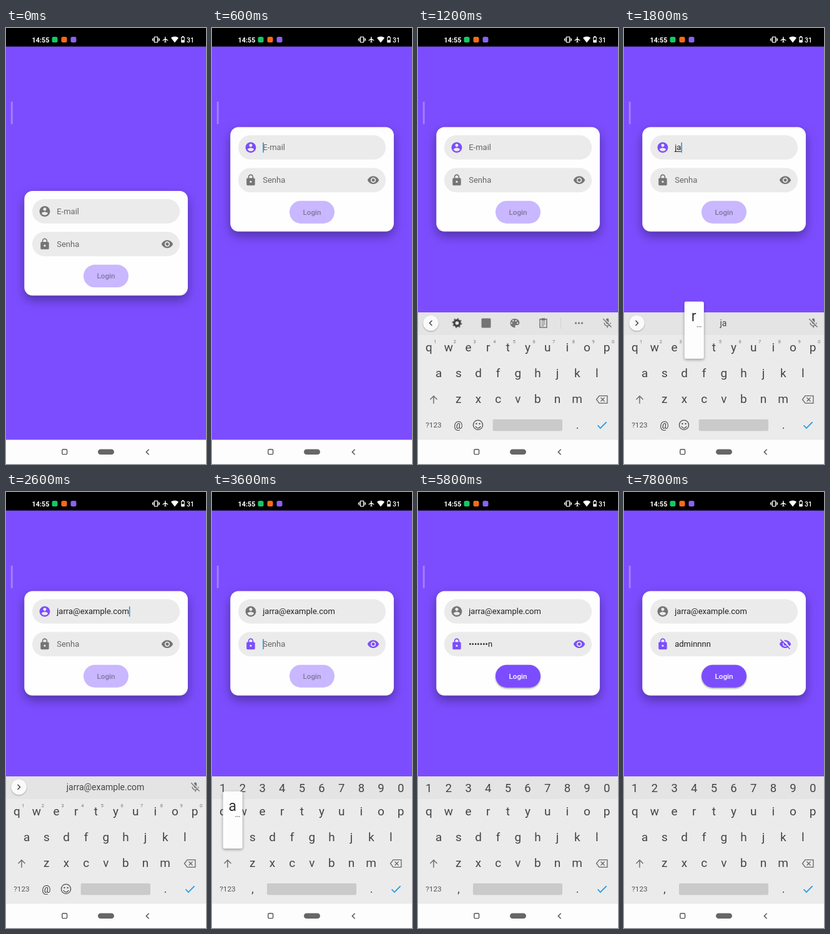
These frames come from a looping animation (320 by 693 pixels, 8000 ms). An HTML page with a canvas:

```html
<!DOCTYPE html>
<html lang="pt-BR">
<head>
<meta charset="utf-8">
<title>Login</title>
<style>
html, body { margin: 0; width: 100%; height: 100%; overflow: hidden; background: #7c4dff; }
canvas { display: block; width: 320px; height: 693px; }
</style>
</head>
<body>
<canvas id="stage"></canvas>
<script>
const W = 320, H = 693, LOOP = 8000, TICK = 200;
const KB_TOP = 452, KB_H = H - KB_TOP, PITCH = 31.65;
const PURPLE = '#7c4dff', GREY = '#757575', INK = '#454545', BLUE = '#2196e3';
const EMAIL = 'jarra@example.com', SECRET = 'adminnnn';

const canvas = document.getElementById('stage');
const ctx = canvas.getContext('2d');
const dpr = window.devicePixelRatio || 1;
canvas.width = W * dpr;
canvas.height = H * dpr;

const USER = new Path2D('M12 2C6.48 2 2 6.48 2 12s4.48 10 10 10 10-4.48 10-10S17.52 2 12 2zm0 3c1.66 0 3 1.34 3 3s-1.34 3-3 3-3-1.34-3-3 1.34-3 3-3zm0 14.2c-2.5 0-4.71-1.28-6-3.22.03-1.99 4-3.08 6-3.08 1.99 0 5.97 1.09 6 3.08-1.29 1.94-3.5 3.22-6 3.22z');
const LOCK = new Path2D('M18 8h-1V6c0-2.76-2.24-5-5-5S7 3.24 7 6v2H6c-1.1 0-2 .9-2 2v10c0 1.1.9 2 2 2h12c1.1 0 2-.9 2-2V10c0-1.1-.9-2-2-2zm-6 9c-1.1 0-2-.9-2-2s.9-2 2-2 2 .9 2 2-.9 2-2 2zm3.1-9H8.9V6c0-1.71 1.39-3.1 3.1-3.1s3.1 1.39 3.1 3.1v2z');
const EYE = new Path2D('M12 4.5C7 4.5 2.73 7.61 1 12c1.73 4.39 6 7.5 11 7.5s9.27-3.11 11-7.5c-1.73-4.39-6-7.5-11-7.5zM12 17c-2.76 0-5-2.24-5-5s2.24-5 5-5 5 2.24 5 5-2.24 5-5 5zm0-8c-1.66 0-3 1.34-3 3s1.34 3 3 3 3-1.34 3-3-1.34-3-3-3z');
const PLANE = new Path2D('M10.2 9V3.5a1.5 1.5 0 0 1 3 0V9l8.3 5v2l-8.3-2.5V19l2.3 1.5V22l-3.8-1-3.7 1v-1.5l2.2-1.5v-5.5L2 16v-2z');
const WIFI = new Path2D('M12 22L0 7C7 1 17 1 24 7z');
const PALETTE = new Path2D('M12 3a9 9 0 0 0 0 18c1.5 0 2-1.3 1.3-2.4-.8-1.2 0-2.6 1.7-2.6h2a5 5 0 0 0 5-5c0-4.4-4.5-8-10-8z');

// Each step overrides the state from its time on.
const STEPS = [
  [0, { focus: '', email: '', pass: '', pop: '', caret: false, show: false, typing: false }],
  [400, { focus: 'email', caret: true }],
  [1200, { caret: false }],
  [1400, { caret: true, pop: 'j' }],
  [1600, { email: 'j', pop: 'a', typing: true }],
  [1800, { email: 'ja', pop: 'r' }],
  [2000, { email: 'jar', pop: '', hint: EMAIL }],
  [2400, { caret: false }],
  [2600, { email: EMAIL, caret: true, hint: '' }],
  [2800, { typing: false }],
  [3200, { focus: 'pass' }],
  [3600, { pop: 'a' }],
  [3800, { pass: 'a', pop: 'd' }],
  [4000, { pass: '•d', pop: 'm' }],
  [4200, { pass: '••m', pop: '' }],
  [4400, { pop: 'i' }],
  [4600, { pass: '•••i', pop: 'n' }],
  [4800, { pass: '••••n' }],
  [5000, { pass: '•••••n' }],
  [5200, { pass: '••••••n' }],
  [5400, { pass: '•••••••n', pop: '' }],
  [5800, { caret: false }],
  [6200, { pass: SECRET, show: true }],
  [6400, { caret: true }],
  [6800, { pass: '••••••••', show: false }],
  [7000, { caret: false }],
  [7200, { pass: SECRET, show: true }],
  [7400, { caret: true }],
  [7800, { caret: false }]
];

const stateAt = t => Object.assign({}, ...STEPS.filter(s => s[0] <= t).map(s => s[1]));

function box(x, y, w, h, r, fill) {
  ctx.beginPath();
  ctx.roundRect(x, y, w, h, r);
  ctx.fillStyle = fill;
  ctx.fill();
}

function disc(x, y, r, fill) {
  box(x - r, y - r, 2 * r, 2 * r, r, fill);
}

function line(points, color, width = 1.5, close = false) {
  ctx.beginPath();
  points.forEach(([x, y]) => ctx.lineTo(x, y));
  if (close) ctx.closePath();
  ctx.strokeStyle = color;
  ctx.lineWidth = width;
  ctx.stroke();
}

function text(s, x, y, size, color, align = 'center', weight = 400) {
  ctx.font = `${weight} ${size}px Roboto, sans-serif`;
  ctx.textAlign = align;
  ctx.fillStyle = color;
  ctx.fillText(s, x, y);
}

function shadowed(blur, dy, alpha, draw) {
  ctx.save();
  ctx.shadowColor = `rgba(0,0,0,${alpha})`;
  ctx.shadowBlur = blur * dpr;
  ctx.shadowOffsetY = dy * dpr;
  draw();
  ctx.restore();
}

function icon(path, cx, cy, size, color) {
  ctx.save();
  ctx.translate(cx - size / 2, cy - size / 2);
  ctx.scale(size / 24, size / 24);
  ctx.fillStyle = color;
  ctx.fill(path, 'evenodd');
  ctx.restore();
}

function statusBar() {
  box(0, 0, W, 29.5, 0, '#000');
  text('14:55', 41.5, 22.5, 10.8, '#fff', 'left', 700);
  ['#16c765', '#f66b16', '#8a62f5'].forEach((c, i) => box(73.5 + 15 * i, 14, 9, 9, 2.5, c));
  ctx.strokeStyle = '#fff';
  ctx.lineWidth = 1.1;
  ctx.strokeRect(237.6, 14.2, 4.8, 8.6);
  for (const d of [-1, 1]) {
    line([[240 + d * 4, 15.5], [240 + d * 4, 21.5]], '#fff', 1.1);
    line([[240 + d * 5.6, 16.8], [240 + d * 5.6, 20.2]], '#fff', 1.1);
  }
  icon(PLANE, 255, 18.3, 11, '#fff');
  icon(WIFI, 270, 18.2, 12, '#fff');
  box(280.2, 14, 5.6, 9.3, 1, '#fff');
  box(281.7, 13, 2.6, 1.5, 0, '#fff');
  box(281.3, 15.2, 3.4, 4, 0, '#000');
  text('31', 289, 22.5, 10.5, '#fff', 'left', 500);
}

function field(y, glyph, label, value, active, s) {
  const mid = y + 19.4;
  box(42, y, 236, 38.8, 19.4, '#ebebeb');
  icon(glyph, 62, mid, 20.2, active ? PURPLE : GREY);
  text(value || label, 81.2, mid + 4.6, 13, value ? '#212121' : '#666', 'left');
  const end = 81.2 + (value ? ctx.measureText(value).width : 0);
  if (value && active && s.typing && value !== EMAIL) box(81.5, mid + 6.1, end - 81.5, 1, 0, '#212121');
  if (active && s.caret) box(end, mid - 8, 1.6, 16.5, 0.8, BLUE);
}

function eye(x, y, color, off) {
  icon(EYE, x, y, 20, color);
  if (!off) return;
  line([[x - 6.3, y - 8.8], [x + 8.8, y + 6.3]], '#ebebeb', 1.8);
  line([[x - 7.6, y - 7.3], [x + 7.4, y + 7.7]], color, 1.6);
}

function loginCard(y, s, enabled) {
  shadowed(17, 7, 0.36, () => box(29.3, y, 261.6, 166.2, 13, '#fefefe'));
  field(y + 13, USER, 'E-mail', s.email, s.focus === 'email', s);
  field(y + 65, LOCK, 'Senha', s.pass, s.focus === 'pass', s);
  eye(258, y + 84.4, s.focus === 'pass' ? PURPLE : GREY, s.show);
  const button = () => box(124, y + 117.3, 72, 36, 18, enabled ? PURPLE : '#c9b7ff');
  enabled ? shadowed(3, 1.5, 0.4, button) : button();
  text('Login', 160, y + 139.4, 11.7, enabled ? '#fff' : '#81749f', 'center', 500);
}

const ROWS = [['qwertyuiop', 17.3, 508], ['asdfghjkl', 33.2, 549], ['zxcvbnm', 64.8, 590]];

function mic(x, y) {
  box(x - 2.2, y - 7.5, 4.4, 9, 2.2, GREY);
  ctx.beginPath();
  ctx.arc(x, y - 0.5, 5, 0, Math.PI);
  ctx.strokeStyle = GREY;
  ctx.lineWidth = 1.4;
  ctx.stroke();
  line([[x, y + 4.5], [x, y + 7.5]], GREY);
  line([[x - 5.8, y - 7.8], [x + 7.2, y + 5.2]], '#e4e4e4', 1.5);
  line([[x - 6.8, y - 6.8], [x + 6.5, y + 6.5]], GREY, 1.4);
}

function tools(y) {
  ctx.save();
  ctx.setLineDash([2.7, 2.7]);
  ctx.beginPath();
  ctx.arc(62.5, y, 6.9, 0, 7);
  ctx.strokeStyle = GREY;
  ctx.lineWidth = 2.2;
  ctx.stroke();
  ctx.restore();
  ctx.beginPath();
  ctx.arc(62.5, y, 4.5, 0, 7);
  ctx.lineWidth = 3.4;
  ctx.stroke();
  box(101.5, y - 7.5, 15, 15, 1.5, GREY);
  icon(PALETTE, 154.5, y, 19, GREY);
  [[-4.8, 0], [-2.3, -3.8], [2.3, -3.8], [4.8, 0]].forEach(([dx, dy]) => disc(154.5 + dx, y + dy, 1.2, '#e4e4e4'));
  ctx.strokeStyle = GREY;
  ctx.lineWidth = 1.5;
  ctx.strokeRect(195, y - 6.2, 11, 13.2);
  box(197.4, y - 7.7, 6.2, 4, 1, GREY);
  [-1.5, 1.5, 4.3].forEach((dy, i) => line([[197.5, y + dy], [i < 2 ? 203.5 : 201.5, y + dy]], GREY, 1.2));
  line([[228.5, y - 9], [228.5, y + 9]], '#d2d2d2', 1);
  [-5, 0, 5].forEach(dx => disc(257.5 + dx, y, 1.6, GREY));
}

function topBar(s) {
  const y = 469;
  if (s.focus === 'pass') {
    [...'1234567890'].forEach((d, i) => text(d, 17.3 + PITCH * i, y + 7.8, 18.5, INK));
    return;
  }
  shadowed(2, 1, 0.3, () => disc(20.5, y, 12.3, '#fafafa'));
  const d = s.typing ? 2 : -2;
  line([[20.5 - d, y - 4], [20.5 + d, y], [20.5 - d, y + 4]], '#444', 1.5);
  if (s.typing) text(s.hint || s.email, 159, y + 5.2, 14, INK);
  else tools(y);
  mic(303, y);
}

function bottomRow(pass) {
  text('?123', 25, 635.3, 11.8, '#555');
  if (pass) {
    text(',', 65, 637, 18, INK);
  } else {
    text('@', 64.5, 637, 16, INK);
    ctx.strokeStyle = '#555';
    ctx.lineWidth = 1.4;
    ctx.beginPath();
    ctx.arc(96, 631, 7.6, 0, 7);
    ctx.stroke();
    ctx.beginPath();
    ctx.arc(96, 632, 4, 0.2, Math.PI - 0.2);
    ctx.stroke();
    disc(93.4, 629, 1.2, '#555');
    disc(98.6, 629, 1.2, '#555');
  }
  const x = pass ? 88 : 119.7;
  box(x, 622, 231 - x, 18.5, 2, '#cacaca');
  text('.', 255, 637, 18, INK);
  line([[287.5, 631.5], [291.8, 636], [301.5, 626.3]], BLUE, 1.7);
}

function popup(key) {
  const row = ROWS.find(r => r[0].includes(key));
  const x = row[1] + PITCH * row[0].indexOf(key), y = row[2] - 73.3;
  shadowed(4, 1.5, 0.4, () => box(x - 15.6, y, 31.2, 91, 3, '#fdfdfd'));
  text(key, x - 0.5, y + 31, 23, '#333');
  if ('arid'.includes(key)) [6, 8.7, 11.4].forEach(dx => disc(x + dx - 0.8, y + 40, 0.75, '#444'));
}

function keyboard(s) {
  const pass = s.focus === 'pass';
  box(0, KB_TOP, W, KB_H, 0, '#ebebeb');
  box(0, KB_TOP, W, 36, 0, '#e4e4e4');
  box(0, 654.5, W, 40, 0, '#fdfdfd');
  topBar(s);
  ROWS.forEach(([keys, x, y], r) => [...keys].forEach((k, i) => {
    text(k, x + PITCH * i, y + 6, 19, INK);
    if (!r && !pass) text((i + 1) % 10, x + PITCH * i + 10, y - 7, 7.5, '#777');
  }));
  line([[25, 597], [25, 585.5]], '#666', 1.4);
  line([[19.5, 590.5], [25, 585], [30.5, 590.5]], '#666', 1.4);
  line([[285.5, 590.5], [290, 584.7], [302.8, 584.7], [302.8, 596.3], [290, 596.3]], '#666', 1.3, true);
  line([[292.5, 587.5], [298.5, 593.5]], '#666', 1.3);
  line([[298.5, 587.5], [292.5, 593.5]], '#666', 1.3);
  bottomRow(pass);
  if (s.pop) popup(s.pop);
}

function navIcons() {
  ctx.beginPath();
  ctx.roundRect(89.8, 669.8, 7.8, 7.8, 1.6);
  ctx.strokeStyle = '#555';
  ctx.lineWidth = 1.4;
  ctx.stroke();
  box(147, 669.5, 26, 8.6, 4.3, '#666');
  line([[228.6, 669.8], [224.4, 674], [228.6, 678.2]], '#555', 1.5);
}

function draw(t) {
  const s = stateAt(t);
  const p = Math.min(1, Math.max(0, (t - 640) / 400));
  ctx.setTransform(dpr, 0, 0, dpr, 0, 0);
  box(0, 0, W, H, 0, PURPLE);
  box(7.8, 117, 2.9, 36, 1, '#a380fb');
  loginCard(t < 600 ? 259 : 157.4, s, t >= 5200);
  statusBar();
  box(0, 654.5, W, 40, 0, '#fdfdfd');
  if (p > 0) {
    box(0, 654.5, W, 40, 0, PURPLE);
    ctx.save();
    ctx.translate(0, KB_H * (1 - p) ** 2);
    keyboard(s);
    ctx.restore();
  }
  navIcons();
}

const start = performance.now();
function frame() {
  const t = (performance.now() - start) % LOOP;
  draw(Math.floor(t / TICK) * TICK);
  requestAnimationFrame(frame);
}
frame();
</script>
</body>
</html>
```
